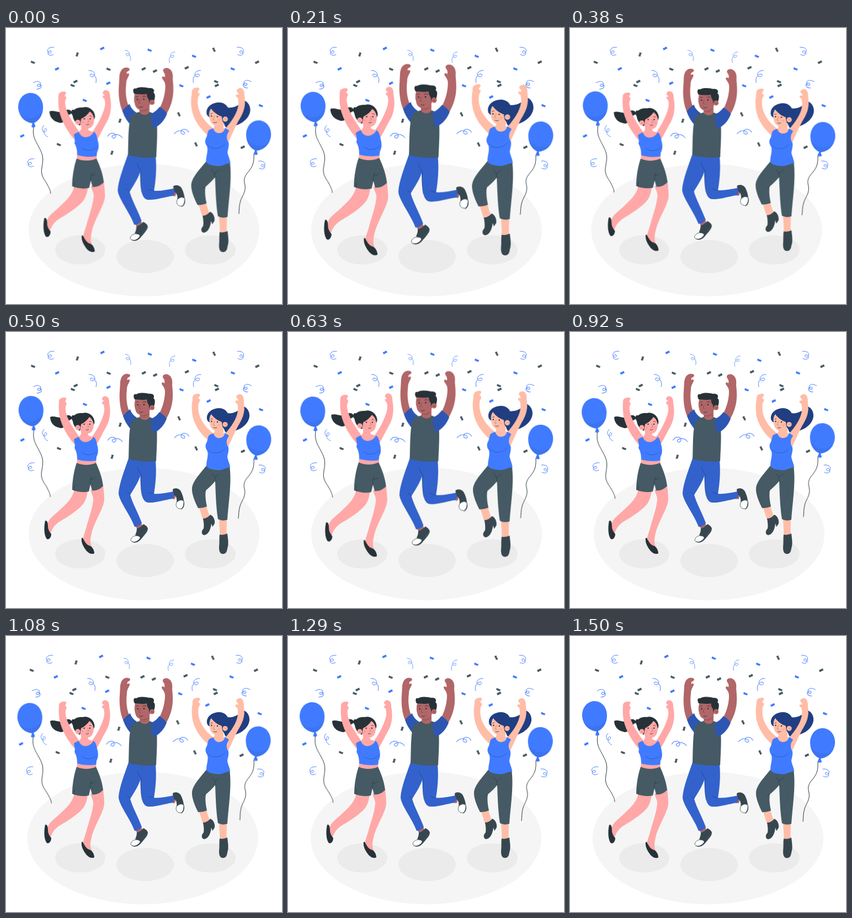
Write an HTML page that moves like this. It is 500x500 px and loops after 1540 ms.

```html
<!DOCTYPE html>
<html lang="en">
<head>
<meta charset="utf-8">
<title>Party jump</title>
<style>
  html, body { margin: 0; width: 100%; height: 100%; overflow: hidden; background: #fff; }
  svg { display: block; width: 100%; height: 100%; }

  .shake, .sway, .beat { animation: 1540ms linear -40ms infinite; }
  .shake { animation-name: shake; }
  .sway { animation-name: sway; transform-origin: 251px 227px; }
  .beat { animation-name: beat; }
  #ann { transform-origin: 129px 260px; }
  #ben { transform-origin: 263.5px 229px; }
  #cleo { transform-origin: 389px 257px; }

  @keyframes shake {
    0%, 100% { transform: none; }
    10%, 90% { transform: translateX(-1px); }
    20%, 80% { transform: translateX(2px); }
    30%, 50%, 70% { transform: translateX(-4px); }
    40%, 60% { transform: translateX(4px); }
  }
  @keyframes sway {
    0%, 100% { transform: rotate(0deg); }
    25% { transform: rotate(1deg); }
    75% { transform: rotate(-1deg); }
  }
  @keyframes beat {
    0%, 30%, 40%, 60%, 100% { transform: scale(1); }
    10%, 50% { transform: scale(1.1); }
  }

  .blue { fill: #407bff; }
  .navy { fill: #2d56b3; }
  .denim { fill: #3362cc; }
  .slate { fill: #455a64; }
  .ink { fill: #263238; }
  .boot { fill: #37474f; }
  .hair { fill: #203e80; }
  .rose { fill: #ffa8a7; }
  .brown { fill: #b16668; }
  .peach { fill: #ffbda7; }
  .shade { fill: #000; opacity: .1; }
  .line, .face { fill: none; stroke: #263238; stroke-linecap: round; }
  .line { stroke-width: 1; }
  .face { stroke-width: .8; }
  .fold { fill: none; stroke: #000; stroke-opacity: .3; stroke-width: .8; stroke-linecap: round; }
  .toe { fill: #fff; stroke: #37474f; stroke-width: .8; }
  .curls { fill: none; stroke: #407bff; stroke-width: 1; stroke-linecap: round; }
</style>
</head>
<body>
<svg viewBox="0 0 500 500">
  <defs>
    <path id="up" d="M-4 -.5C-1 -.5 0 -3 3 -3.2L4.2 .4C1 .6 0 3 -2.8 3.2Z"/>
    <path id="down" d="M-2.6 -3.2C-1 -1 1 -1.6 4.2 .2L2.4 3.2C0 1.6 -2 2.4 -4.2 0Z"/>
    <path id="steep" d="M-.6 -4L3.2 -3C2 -.6 2 1.6 .8 4L-3 2.8C-1 .6 -1.6 -2 -.6 -4Z"/>
    <path id="lean" d="M-3.2 -3L.4 -4.2C.6 -1.6 2.4 0 3.2 2.6L0 4.2C-.4 1.4 -2.6 0 -3.2 -3Z"/>
    <path id="curl" d="M6 -7C-2 -8 -7 -4 -5 1C-3 6 3 3 1 0C-1 -2 -6 1 -4.5 5C-3 8 2 8 5 6"/>
    <path id="twirl" d="M-7 -11C1 -12 6 -5 3 -1C0 2 -6 0 -4 -4C-2 -6 4 -3 6 2C7 5 7 8 6 11"/>
    <g id="balloon">
      <path class="blue" d="M43 118C57 117 67 129 67 144C67 158 60 169 49 173C35 172 24 162 22 146C21 131 30 119 43 118Z"/>
      <path class="shade" style="opacity:.06" d="M24 155C35 168 55 167 66 151C63 162 58 169 49 173C38 172 28 165 24 155Z"/>
      <path class="blue" d="M48 172L51 172C51 175 54 177 53 179C51 181 47 181 46 179C46 177 48 175 48 172Z"/>
      <path class="shade" d="M47 174h5l-.5 1.5h-4z"/>
    </g>
  </defs>

  <ellipse class="shake" cx="250" cy="366" rx="209" ry="120" fill="#f5f5f5"/>
  <g fill="#ebebeb">
    <ellipse cx="134.5" cy="402" rx="45.5" ry="26.5"/>
    <ellipse cx="252" cy="414" rx="52" ry="30"/>
    <ellipse cx="370" cy="402" rx="46" ry="26.5"/>
  </g>

  <g class="shake">
    <g class="blue">
      <use href="#up" x="174.500" y="37"/><use href="#up" x="92.500" y="74"/>
      <use href="#down" x="143" y="131"/><use href="#up" x="185.500" y="100"/>
      <use href="#down" x="260.500" y="40"/><use href="#down" x="341" y="51"/>
      <use href="#down" x="318" y="104.500"/><use href="#up" x="367" y="125"/>
      <use href="#down" x="411" y="74"/><use href="#down" x="462" y="140.500"/>
      <use href="#up" x="29.500" y="195.500"/>
    </g>
    <g class="slate">
      <use href="#down" x="49" y="62"/><use href="#steep" x="129" y="48"/>
      <use href="#down" x="186" y="74.500"/><use href="#up" x="126" y="97"/>
      <use href="#down" x="121" y="104"/><use href="#steep" x="206.500" y="168"/>
      <use href="#steep" x="192" y="226"/><use href="#down" x="96" y="211"/>
      <use href="#up" x="249.500" y="74"/><use href="#up" x="270" y="78"/>
      <use href="#up" x="327.500" y="72"/><use href="#lean" x="377" y="39.500"/>
      <use href="#down" x="381" y="97"/><use href="#up" x="382" y="104"/>
      <use href="#lean" x="313.500" y="156.500"/><use href="#lean" x="344.500" y="211"/>
      <use href="#up" x="429" y="216"/><use href="#up" x="455" y="62"/>
    </g>
    <g class="curls">
      <use href="#curl" x="81" y="42"/>
      <use href="#curl" transform="translate(58 103)rotate(-25)scale(-1 1)"/>
      <use href="#twirl" x="157" y="88"/>
      <use href="#twirl" transform="translate(72 187)rotate(-48)scale(-.85 .85)"/>
      <use href="#curl" x="45" y="244"/>
      <use href="#twirl" transform="translate(198 197)rotate(-55)scale(1 1.05)"/>
      <use href="#twirl" transform="translate(221 50)scale(.75 .85)"/>
      <use href="#twirl" transform="translate(301 53)scale(-.75 .85)"/>
      <use href="#twirl" transform="translate(346 88)scale(-1 1)"/>
      <use href="#curl" transform="translate(436 101)rotate(25)"/>
      <use href="#curl" transform="translate(425 42)scale(-1 1)"/>
      <use href="#curl" transform="translate(464 248)scale(-1 1)"/>
      <use href="#twirl" transform="translate(318 190)rotate(55)scale(-1 1.05)"/>
    </g>
  </g>

  <g class="sway">
    <path class="line" d="M50 180C47 197 54 205 60 217C69 233 67 240 65 253C62 268 70 275 75 284C78 290 81 295 81 300"/>
    <path class="line" d="M449 228C450 245 446 251 440 259C430 270 431 276 433 284C435 297 428 303 425 313C422 322 423 330 422 336"/>
    <use href="#balloon"/>
    <use href="#balloon" transform="translate(502 49)scale(-1 1)"/>
  </g>

  <!-- left dancer -->
  <g id="ann" class="beat">
    <path class="ink" d="M80 154C86 151 94 156 101 155C107 152 112 149 117 152L122 157C116 158 113 161 111 165C107 173 101 176 95 173C86 171 80 163 80 154Z"/>
    <path class="ink" d="M120 151C118 153 119 161 122 162L127 160L125 151Z"/>
    <path class="rose" d="M124 286C119 304 108 312 98 322C86 333 78 338 76 346C75 352 75 358 74 363L80 367C83 357 88 349 98 343C115 333 138 318 143 306C146 300 147 294 148 287Z"/>
    <path class="ink" d="M71 342C75 341 76 346 76 352C76 358 79 362 82 366C82 372 78 377 74 375C68 368 69 350 71 342Z"/>
    <path class="rose" d="M153 286C155 293 159 299 158 305C156 322 150 337 146 352C143 363 140 369 139 378C144 388 150 391 157 393C152 384 152 377 155 365C160 343 178 318 178 303C178 295 177 288 176 278Z"/>
    <path class="ink" d="M139 373C142 379 146 386 151 387C156 388 160 395 160 401C155 404 148 400 144 394C139 387 136 380 137 373Z"/>
    <path class="rose" d="M129 226H164L163 242H128Z"/>
    <path class="rose" d="M96 126C96 121 100 119 104 119C109 118 111 121 108 124C106 128 109 126 110 130C108 134 107 137 108 142C110 157 120 171 132 189L128 208C116 195 105 179 99 160C96 150 95 138 96 126Z"/>
    <path class="rose" d="M174 121C175 117 179 115 182 117C186 118 187 123 187 128C191 150 187 164 178 178C173 188 168 197 163 206L156 190C165 177 173 162 177 148C179 140 178 136 177 132C174 130 173 127 175 126L178 126C176 124 174 123 174 121Z"/>
    <path class="rose" d="M135 174L148 181L149 187C153 190 158 189 161 191L155 205H136L124 195C130 191 135 189 136 184Z"/>
    <path class="blue" d="M123 195C126 192 129 191 132 190C134 197 141 202 150 198C154 196 157 193 158 190C162 191 164 198 165 204C168 214 167 221 164 226L163 233C152 235 139 234 129 231C129 221 127 215 124 210C126 205 124 200 123 195Z"/>
    <path class="fold" d="M137 218C144 225 158 224 164 216"/>
    <path class="slate" d="M128 237C123 251 120 270 120 286C130 290 141 291 150 289L153 276L156 287C163 288 170 285 176 279C174 262 168 248 163 237C152 242 139 242 128 237Z"/>
    <path class="fold" d="M153 276C152 270 153 266 156 262M153 267Q158 268 162 264M124 278Q123 284 124 288"/>
    <path class="rose" d="M131 160C132 151 140 148 149 150C156 152 159 160 159 169C158 179 154 184 147 184C139 183 134 178 132 173Z"/>
    <path class="ink" d="M121 158C121 149 131 146 139 147C147 144 158 150 160 160C161 163 160 166 159 168C158 162 156 157 151 154C148 159 142 164 136 167L134 179C127 176 120 168 121 158Z"/>
    <circle class="rose" cx="130" cy="173" r="4.500"/>
    <circle class="ink" cx="141.500" cy="167" r="1.200"/><circle class="ink" cx="152" cy="167" r="1.200"/>
    <path class="face" d="M139 163Q141 161 143 162M151 162Q154 161 155 163M145 177Q148 178.500 150 176.500"/>
    <path class="fold" d="M148 167L150 172L147 173M129 172Q131 173 131 175"/>
    <ellipse cx="139" cy="173" rx="2.500" ry="1.800" fill="#ff7b7b" opacity=".3"/>
    <ellipse cx="154" cy="173" rx="2" ry="1.800" fill="#ff7b7b" opacity=".3"/>
  </g>

  <!-- middle dancer -->
  <g id="ben" class="beat">
    <path class="brown" d="M207 90C208 83 211 77 217 76C223 75 227 78 224 81C220 83 219 84 220 87C222 85 225 86 224 89C222 94 219 97 219 104C217 120 219 133 223 143L213 154C206 140 205 120 206 108Z"/>
    <path class="brown" d="M284 81C284 77 290 75 295 78C300 81 302 87 301 96C303 115 304 134 290 158L278 147C284 136 288 121 288 108C288 101 284 98 282 94C282 90 285 91 287 93C288 89 287 86 285 84Z"/>
    <path class="navy" d="M212 152C216 147 220 143 225 140C227 147 232 152 237 155L225 175C219 168 215 161 212 152Z"/>
    <path class="brown" d="M300 290L306 289C308 295 308 299 305 303L300 302Z"/>
    <path class="boot" d="M302 285C306 282 314 283 317 289C320 295 322 302 322 307L309 310C310 303 309 296 303 295Z"/>
    <path class="toe" d="M309 309C313 304 319 303 322 307C323 313 321 319 317 320C311 321 306 316 309 309Z"/>
    <path class="boot" d="M322 305C325 314 321 321 316 322C321 318 322 312 322 305Z"/>
    <path class="denim" d="M242 231L271 233C273 254 271 276 268 293C280 294 291 291 303 289C305 294 305 299 302 302C287 304 271 310 257 309C247 307 245 293 244 278Z"/>
    <path class="brown" d="M233 348L244 344L248 353L238 358Z"/>
    <path class="denim" d="M222 229C214 252 205 275 204 292C204 305 226 333 233 353C238 353 243 350 246 346C240 329 229 310 225 295C233 282 241 270 244 258L258 232Z"/>
    <path class="fold" d="M244 257C242 254 240 251 238 246M245 258C244 271 244 282 246 296M268 293Q263 293 258 290M225 295L220 290"/>
    <path class="boot" d="M237 356C241 355 246 352 249 348C253 350 257 353 257 357C253 362 248 366 244 373L234 368C236 364 237 360 237 356Z"/>
    <path class="toe" d="M226 376C229 369 235 368 241 370C245 372 243 377 238 380C232 382 226 380 226 376Z"/>
    <path class="boot" d="M227 379C235 382 241 377 244 371L257 357C257 362 248 371 244 376C239 382 231 383 227 379Z"/>
    <path class="slate" d="M227 162C232 157 237 155 243 154H259C265 155 269 158 272 163C275 185 273 210 272 234C255 236 236 234 222 230C223 205 222 181 227 162Z"/>
    <path class="navy" d="M263 157C269 155 274 150 278 145C283 148 288 152 291 157C287 168 279 178 267 183C263 175 262 165 263 157Z"/>
    <path class="brown" d="M243 143H260V154C257 161 246 161 242 154Z"/>
    <path class="shade" d="M243 149Q251 151 258 144L256 151Q249 156 243 152Z"/>
    <path class="brown" d="M234 122C240 118 255 118 260 126C264 137 261 147 252 150C243 153 235 148 234 139C232 133 233 127 234 122Z"/>
    <path class="ink" d="M233 122C230 117 231 111 236 113C240 109 252 110 259 112C267 111 270 116 267 120C271 122 270 129 268 135L262 140C259 138 259 136 259 132C257 131 256 127 255 122C248 124 239 122 233 122Z"/>
    <circle class="brown" cx="264.500" cy="137" r="4.600"/>
    <circle class="ink" cx="238.500" cy="132" r="1.300"/><circle class="ink" cx="250" cy="131.500" r="1.300"/>
    <path class="face" d="M236 127.500Q238 126 240 127M248 127Q251 125 254 127M242 145Q245 146.500 248 145"/>
    <path class="fold" d="M243 132L241 138L244 139M263 137Q266 136 266 139"/>
  </g>

  <!-- right dancer -->
  <g id="cleo" class="beat">
    <path class="hair" d="M394 146C408 150 422 145 428 134C436 135 442 144 441 153C439 169 421 181 398 182C392 174 392 157 394 146Z"/>
    <path class="peach" d="M349 316L363 313C364 322 368 329 369 334L357 340C354 332 352 324 349 316Z"/>
    <path class="boot" d="M357 338C362 338 367 335 370 331C376 333 379 341 378 347L374 353L372 347C371 357 367 367 359 368C354 367 353 361 358 356C359 350 358 344 357 338Z"/>
    <path class="peach" d="M386 337H400C400 348 399 359 400 369H387C388 358 386 347 386 337Z"/>
    <path class="boot" d="M387 367C391 368 397 367 401 365C402 374 404 384 401 392C400 400 397 402 393 402C387 402 386 396 386 390C387 381 386 374 387 367Z"/>
    <path class="slate" d="M364 241C352 256 339 269 337 282C336 294 343 309 348 319C354 319 360 318 364 316C361 303 361 293 362 287C369 281 375 275 379 270C380 299 381 321 384 339C390 342 396 342 401 340C404 301 409 272 405 242Z"/>
    <path class="fold" d="M379 272C379 264 377 260 373 256M378 263Q383 261 386 257M362 287L357 289"/>
    <path class="peach" d="M338 122C337 116 341 112 346 112C351 111 353 114 350 117C348 120 348 121 350 121C353 122 351 126 349 129C348 135 348 142 350 149C354 163 363 174 376 184L368 198C354 186 342 171 338 152C336 141 336 131 338 122Z"/>
    <path class="peach" d="M417 118C417 114 422 112 426 113C430 115 431 121 431 128C434 146 428 158 420 171C413 184 408 197 402 209L394 188C404 176 415 163 419 148C421 140 420 134 419 130C415 128 414 124 418 124L421 124C420 121 418 120 417 118Z"/>
    <path class="peach" d="M376 174L394 172L394 183L402 190L393 203H375L367 190C373 186 377 184 378 179Z"/>
    <path class="blue" d="M367 188C370 185 373 184 376 184C378 191 384 194 391 191C395 189 396 186 396 183C399 184 402 186 404 188C398 196 399 203 403 209C404 217 401 222 401 227C403 235 406 240 406 246C399 244 393 252 380 250C371 249 366 247 363 243C363 232 367 225 365 216C360 209 361 204 364 199Z"/>
    <path class="fold" d="M366 213C373 222 388 221 396 212"/>
    <path class="peach" d="M369 152C374 146 392 146 396 156C399 169 393 178 383 180C374 179 368 171 369 162Z"/>
    <path class="hair" d="M364 157C363 146 373 138 387 138C400 139 406 150 403 162L399 176C393 176 391 170 391 163C383 160 376 155 372 149C369 152 368 157 369 164C366 162 364 160 364 157Z"/>
    <circle class="peach" cx="397" cy="167.500" r="4.600"/>
    <circle class="ink" cx="372.500" cy="162" r="1.200"/><circle class="ink" cx="383" cy="163" r="1.200"/>
    <path class="face" d="M371 158L374 157M382 158Q385 158 387 160M376 173Q379 175 382 173"/>
    <path class="fold" d="M378 162L375 168L378 169M396 167Q399 166 399 169"/>
    <ellipse cx="386" cy="169" rx="2.500" ry="1.800" fill="#ff8a65" opacity=".3"/>
  </g>
</svg>
</body>
</html>
```
